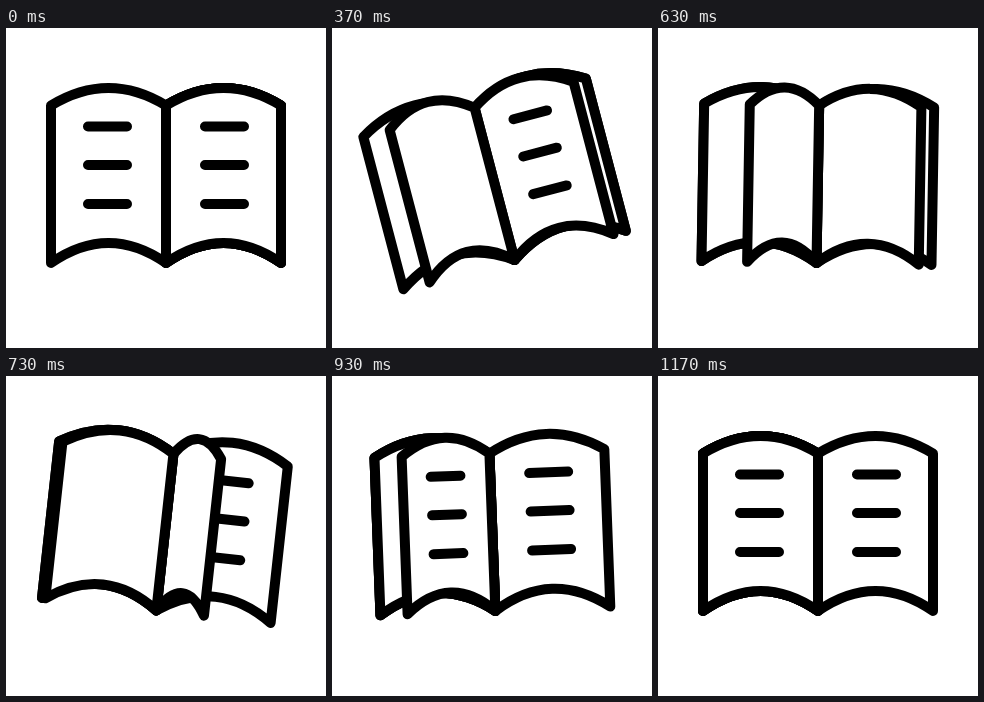
These frames come from a looping animation (320 by 320 pixels, 1500 ms). An HTML page with a canvas:

```html
<!DOCTYPE html>
<html lang="en">
<head>
<meta charset="utf-8">
<title>Book</title>
<style>
  html, body { margin: 0; width: 100%; height: 100%; overflow: hidden; background: #fff; }
  canvas { display: block; width: 100vw; height: 100vh; }
</style>
</head>
<body>
<canvas id="stage" width="320" height="320"></canvas>
<script>
const ctx = document.getElementById('stage').getContext('2d');

const LOOP = 1500, STEPS_PER_MS = 0.03;
const PIVOT = { x: 160, y: 146 };
const PAGE = { width: 115, top: 77.5, topRise: 17.5, bottom: 235, bottomRise: 20 };
const TEXT_ROWS = [98.5, 137, 176];
const TEXT_SPAN = [39, 78];

// Tilt of the book: [step, degrees]
const TILT = [[0, 0], [14.8, -17.6], [21, 7], [27, -3], [31, 2.3], [35, 0]];

// Turning pages, topmost first on the right-hand pile
const TURN_STEPS = 14;
const LEAVES = [
  { start: 0, front: true, back: false },
  { start: 9, front: true, back: false },
  { start: 17, front: false, back: true }
];

const ease = u => {
  u = Math.min(1, Math.max(0, u));
  return u * u * (3 - 2 * u);
};

function tiltAt(step) {
  for (let i = 1; i < TILT.length; i++) {
    const [s0, a0] = TILT[i - 1], [s1, a1] = TILT[i];
    if (step < s1) return a0 + (a1 - a0) * ease((step - s0) / (s1 - s0));
  }
  return 0;
}

// spread: 1 lies flat on the right, -1 flat on the left
function drawPage(spread, hasText) {
  const at = u => PIVOT.x + u * PAGE.width * spread;
  const { top, bottom } = PAGE;
  const crest = top - PAGE.topRise, trough = bottom - PAGE.bottomRise;

  ctx.beginPath();
  ctx.moveTo(at(0), top);
  ctx.quadraticCurveTo(at(0.25), crest, at(0.5), crest);
  ctx.quadraticCurveTo(at(0.75), crest, at(1), top);
  ctx.lineTo(at(1), bottom);
  ctx.quadraticCurveTo(at(0.75), trough, at(0.5), trough);
  ctx.quadraticCurveTo(at(0.25), trough, at(0), bottom);
  ctx.closePath();
  ctx.fill();
  ctx.stroke();

  if (!hasText) return;
  ctx.beginPath();
  for (const y of TEXT_ROWS) {
    ctx.moveTo(PIVOT.x + TEXT_SPAN[0] * spread, y);
    ctx.lineTo(PIVOT.x + TEXT_SPAN[1] * spread, y);
  }
  ctx.stroke();
}

function draw(step) {
  ctx.setTransform(1, 0, 0, 1, 0, 0);
  ctx.fillStyle = '#fff';
  ctx.fillRect(0, 0, 320, 320);
  ctx.strokeStyle = '#000';
  ctx.lineWidth = 10;
  ctx.lineCap = ctx.lineJoin = 'round';

  ctx.translate(PIVOT.x, PIVOT.y);
  ctx.rotate(tiltAt(step) * Math.PI / 180);
  ctx.translate(-PIVOT.x, -PIVOT.y);

  drawPage(-1, true);
  drawPage(1, true);

  const leaves = LEAVES.map(leaf => ({
    ...leaf,
    spread: 1 - 2 * ease((step - leaf.start) / TURN_STEPS)
  }));
  const right = leaves.filter(leaf => leaf.spread >= 0).reverse();
  const left = leaves.filter(leaf => leaf.spread < 0);
  right.forEach(leaf => drawPage(leaf.spread, leaf.front && leaf.spread > 0));
  left.forEach(leaf => drawPage(leaf.spread, leaf.back));
}

const startTime = performance.now();

function tick() {
  const time = (performance.now() - startTime) % LOOP;
  draw(Math.floor(time * STEPS_PER_MS + 0.11));
  requestAnimationFrame(tick);
}

tick();
</script>
</body>
</html>
```
